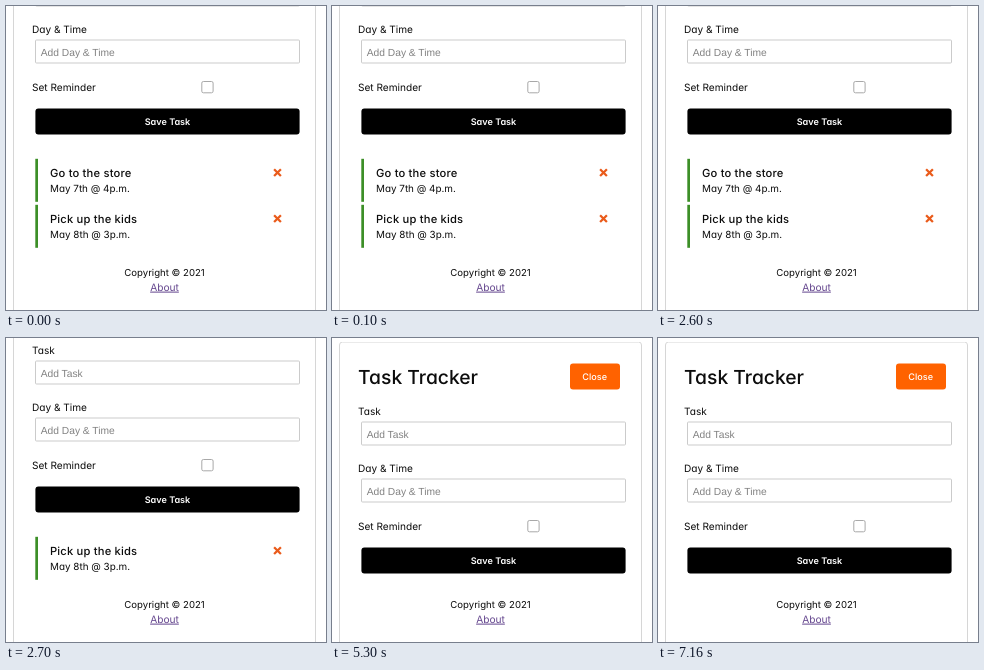
Recreate the animation shown at these times as an HTML page. Size 320 by 304 pixels, loop 8.4 s.

```html
<!DOCTYPE html>
<html lang="en">
<head>
<meta charset="utf-8">
<title>Task list</title>
<style>
  html, body { margin: 0; width: 100%; height: 100%; overflow: hidden; background: #fff; }
  svg { display: block; width: 320px; height: 304px; }
  text {
    font: 10.1px Inter, "Open Sans", sans-serif;
    font-feature-settings: "cv11";
    text-rendering: geometricPrecision;
    fill: #0c0c0c;
  }
  .title { font-size: 19.3px; font-weight: 500; }
  .name { font-size: 11.2px; font-weight: 500; letter-spacing: .18px; }
  .date { font-size: 9.9px; }
  .hint { font: 10.25px "Liberation Sans", Arial, sans-serif; fill: #828282; }
  .button { font-size: 9.1px; font-weight: 600; fill: #fff; text-anchor: middle; }
  .light { font-weight: 500; }
  .foot { font-size: 9.6px; text-anchor: middle; }
  .link { font-size: 10.2px; fill: #66488f; text-decoration: underline; }
  .card { fill: #fff; stroke: #d6d6d6; }
  .box { fill: #fff; stroke: #cbcbcb; }
  .check { fill: #fff; stroke: #a8a8a8; }
  .bar { fill: #3c8f27; }
  .cross { stroke: #ea5b1b; stroke-width: 2.3; }
</style>
</head>
<body>
<svg viewBox="0 0 320 304">
  <defs>
    <path id="remove" class="cross" d="M-3.4-3.4 3.4 3.4M3.4-3.4-3.4 3.4"/>
  </defs>

  <g id="page">
    <rect class="card" x="7.5" y="4.5" width="302" height="500" rx="3"/>
    <text class="title" x="26" y="46">Task Tracker</text>
    <rect x="238" y="26" width="50" height="26" rx="3" fill="#ff6200"/>
    <text class="button light" x="262.7" y="42.3">Close</text>

    <text x="26" y="77">Task</text>
    <rect class="box" x="29.5" y="84.5" width="264" height="23" rx="1"/>
    <text class="hint" x="34.7" y="100">Add Task</text>

    <text x="26" y="134">Day &amp; Time</text>
    <rect class="box" x="29.5" y="141.5" width="264" height="23" rx="1"/>
    <text class="hint" x="34.7" y="157">Add Day &amp; Time</text>

    <text x="26" y="192.5">Set Reminder</text>
    <rect class="check" x="195.8" y="183" width="11.3" height="11.3" rx="1.6"/>
    <rect x="29.4" y="210" width="264.2" height="26" rx="3"/>
    <text class="button" x="161.5" y="226.4">Save Task</text>
  </g>

  <g id="store">
    <rect class="bar" x="29.3" y="152.8" width="2.7" height="43"/>
    <text class="name" x="44" y="171">Go to the store</text>
    <text class="date" x="44" y="185.6">May 7th @ 4p.m.</text>
    <use href="#remove" x="271.5" y="166.6"/>
  </g>
  <g id="kids">
    <rect class="bar" x="29.3" y="198.8" width="2.7" height="43"/>
    <text class="name" x="44" y="217">Pick up the kids</text>
    <text class="date" x="44" y="231.6">May 8th @ 3p.m.</text>
    <use href="#remove" x="271.5" y="212.6"/>
  </g>

  <text class="foot" x="158.5" y="270">Copyright © 2021</text>
  <text class="foot link" x="158.5" y="284.6">About</text>
</svg>

<script>
  const LOOP = 8400;
  const STORE_REMOVED = 2700;
  const KIDS_REMOVED = 5300;

  // Each step is [time in ms, value] and holds until the next one.
  function hold(id, property, steps) {
    const last = [LOOP, steps[steps.length - 1][1]];
    const frames = [...steps, last].map(([time, value]) => ({
      offset: time / LOOP,
      [property]: value,
      easing: "steps(1, end)"
    }));
    document.getElementById(id).animate(frames, { duration: LOOP, iterations: Infinity });
  }

  // The view stays at the page bottom, so the form drops as tasks go.
  hold("page", "transform", [
    [0, "translateY(-107.5px)"],
    [STORE_REMOVED, "translateY(-61.5px)"],
    [KIDS_REMOVED, "translateY(-0.5px)"]
  ]);
  hold("store", "opacity", [[0, 1], [STORE_REMOVED, 0]]);
  hold("kids", "opacity", [[0, 1], [KIDS_REMOVED, 0]]);
</script>
</body>
</html>
```
